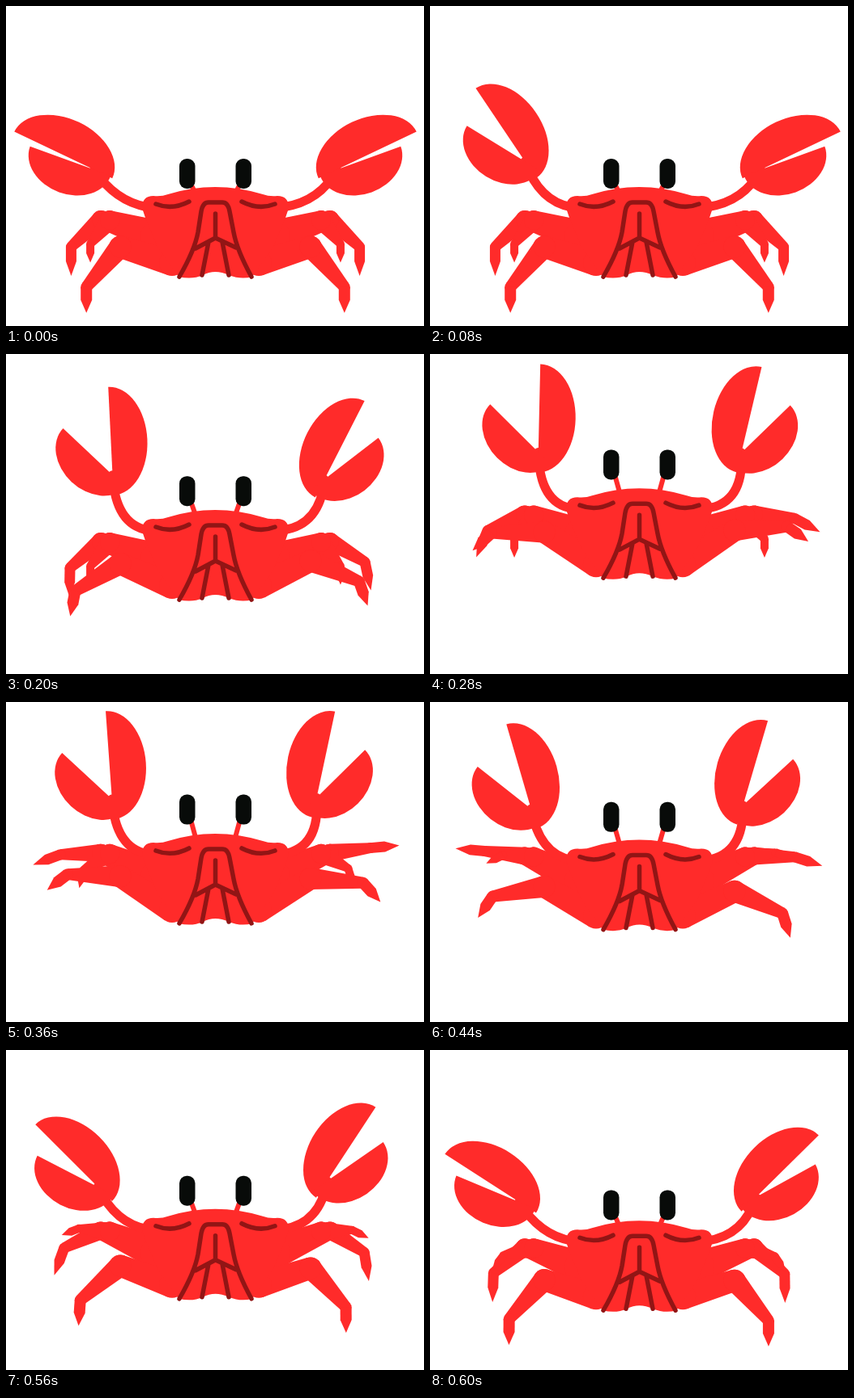
An HTML page with a canvas for the animation above (0.64 s loop, 516 by 396 pixels).

```html
<!DOCTYPE html>
<html>
<head>
<meta charset="utf-8">
<style>
html, body { margin: 0; height: 100%; overflow: hidden; background: #fff; }
canvas { display: block; }
</style>
</head>
<body>
<canvas id="stage" width="516" height="396"></canvas>
<script>
const ctx = document.getElementById('stage').getContext('2d');
const RED = '#ff2b2a', DARK = '#921515', BLACK = '#080b09';
const STEP = 40, STEPS = 16, END = 15.5, AXIS = 517;
const DEG = Math.PI / 180;

// Rest shape and reach of each leg; angles lean outwards from straight down
const LEGS = {
  outer: { hip: [186, 285, 20], knee: [117, 264, 11], shin: 50, foot: 36, r: 6.5, rest: 47, swing: 50, flick: 95 },
  inner: { hip: [186, 285, 20], knee: [128, 265, 12], shin: 38, foot: 23, r: 5, rest: 39, swing: 65, flick: 85 },
  front: { hip: [205, 318, 16], knee: [141, 298, 13.5], shin: 65, foot: 32, r: 7, rest: 40, swing: 54, flick: 55 }
};

// Each part follows pulse(start, peak, rise power, fall power); both sides are drawn as the left one
const SIDES = [
  { claw: [0, 6.5, 1, .9], turn: 66, elbow: 135,
    outer: [4, 11, 2, 1.5], inner: [7, 12.5, 2, .4], front: [3, 8, 2, 1.5] },
  { claw: [2, 8, 1, .45], turn: 53, elbow: 129, mirror: true,
    outer: [3, 9, 2, 1.5], inner: [7, 12, 2, .4], front: [3, 7, 2, 2.5] }
];

// 0 before start, 1 at peak, back to 0 at END
function pulse(k, start, peak, rise, fall) {
  const rising = k < peak;
  const u = rising ? (k - start) / (peak - start) : (END - k) / (END - peak);
  const eased = Math.sin(Math.PI / 2 * Math.min(1, Math.max(0, u)));
  return eased ** (rising ? rise : fall);
}

function fillPoly(points) {
  ctx.beginPath();
  points.forEach(p => ctx.lineTo(...p));
  ctx.fill();
}

function disc(x, y, r) {
  ctx.beginPath();
  ctx.arc(x, y, r, 0, 2 * Math.PI);
  ctx.fill();
}

function limb([x1, y1, r1], [x2, y2, r2]) {
  const d = Math.hypot(x2 - x1, y2 - y1);
  const nx = (y1 - y2) / d, ny = (x2 - x1) / d;
  fillPoly([[x1 + nx * r1, y1 + ny * r1], [x2 + nx * r2, y2 + ny * r2],
    [x2 - nx * r2, y2 - ny * r2], [x1 - nx * r1, y1 - ny * r1]]);
  disc(x1, y1, r1);
  disc(x2, y2, r2);
}

function leg({ hip, knee, shin, foot, r, rest, swing, flick }, p, hipY, kneeY) {
  const thigh = [hip[0], hip[1] + hipY, hip[2]];
  const joint = [knee[0], knee[1] + kneeY, knee[2]];
  const a = (rest + swing * p) * DEG;
  const ankle = [joint[0] - shin * Math.sin(a), joint[1] + shin * Math.cos(a), r];
  limb(thigh, joint);
  limb(joint, ankle);

  ctx.save();
  ctx.translate(ankle[0], ankle[1]);
  ctx.rotate(flick * p ** 1.5 * DEG);
  fillPoly([[-r, 0], [-r, foot / 2], [0, foot], [r, foot / 2], [r, 0]]);
  ctx.restore();
}

function pincer(x, y, degrees, center, rx, ry, from) {
  ctx.beginPath();
  const a = degrees * DEG;
  ctx.ellipse(x + center * Math.cos(a), y + center * Math.sin(a), rx, ry, a, from, from + Math.PI);
  ctx.fill();
}

// The arm swings around the shoulder while both pincers turn and spread
function claw(side, p, dy) {
  const a = (35 + 24.5 * p ** 1.25) * DEG;
  const x = 175 - 81 * Math.cos(a), y = 249 + dy - 81 * Math.sin(a);
  ctx.lineWidth = 11;
  ctx.beginPath();
  ctx.moveTo(x, y);
  ctx.quadraticCurveTo(side.elbow, 242 + dy, 175, 249 + dy);
  ctx.stroke();
  pincer(x, y, 25.5 + side.turn * p, -42, 67, 45, Math.PI);
  pincer(x, y, 20 + 25 * p, -31, 53, 41, 0);
}

function drawSide(side, k, dy, eyeY) {
  const back = -20 * pulse(k, 4, 11, 2, .6);
  const p = part => pulse(k, ...side[part]);
  leg(LEGS.outer, p('outer'), dy + back * .5, dy + back);
  leg(LEGS.inner, p('inner'), dy + back * .5, dy + back);
  leg(LEGS.front, p('front'), dy, dy - 22 * p('front'));
  claw(side, p('claw'), dy);

  // Eye stalk
  ctx.lineWidth = 6;
  ctx.beginPath();
  ctx.moveTo(228, 220 + eyeY);
  ctx.lineTo(236, 236 + dy);
  ctx.stroke();
}

const shell = new Path2D('M168 250Q168 235 182 235Q192 236 200 233Q258 215 317 233Q325 236 335 235Q349 235 349 250L345 262L330 298L304 335Q290 339 275 333Q258 325 243 333Q230 339 213 335L187 298L172 262Z');
const marks = new Path2D('M185 245Q205 253 226 242M291 242Q312 253 332 245M214 335Q233 302 237 280L241 254Q243 243 250 243H267Q274 243 276 254L281 280Q285 302 303 335M258.5 257V287M234 300L258.5 287L284 299M250 292L242 333M267 292L275 333');

function draw(k) {
  const dy = -62 * pulse(k, 2, 8, 2, .7), eyeY = dy * 1.22;
  ctx.fillStyle = '#fff';
  ctx.fillRect(0, 0, 516, 396);
  ctx.fillStyle = ctx.strokeStyle = RED;
  ctx.lineCap = ctx.lineJoin = 'round';

  for (const side of SIDES) {
    ctx.save();
    if (side.mirror) ctx.transform(-1, 0, 0, 1, AXIS, 0);
    drawSide(side, k, dy, eyeY);
    ctx.restore();
  }

  ctx.save();
  ctx.translate(0, dy);
  ctx.fill(shell);
  ctx.strokeStyle = DARK;
  ctx.lineWidth = 5.5;
  ctx.stroke(marks);
  ctx.restore();

  ctx.fillStyle = BLACK;
  for (const x of [214, 283.5]) {
    ctx.beginPath();
    ctx.roundRect(x, 189 + eyeY, 19.5, 37, 9);
    ctx.fill();
  }
}

const start = performance.now();
function tick() {
  draw(Math.floor((performance.now() - start) / STEP) % STEPS);
  requestAnimationFrame(tick);
}
tick();
</script>
</body>
</html>
```
